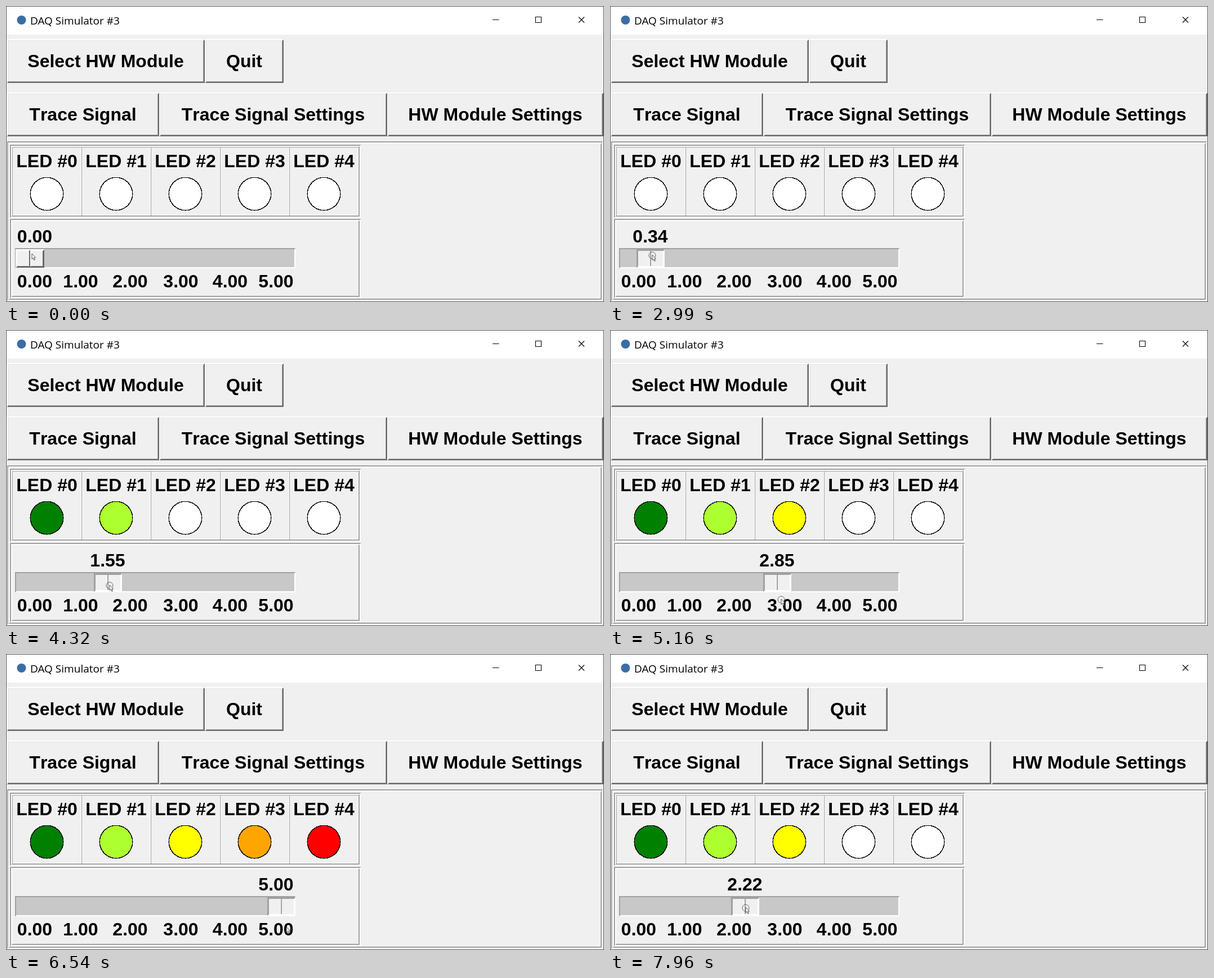
An HTML page for the animation above (8000 ms loop, 1062 by 527 pixels).

```html
<!DOCTYPE html>
<html lang="en">
<head>
<meta charset="utf-8">
<title>DAQ Simulator</title>
<style>
  html, body { margin: 0; width: 100%; height: 100%; overflow: hidden; background: #f0f0f0; }
  svg { display: block; width: 1062px; height: 527px; }
  text { font: bold 32px "Liberation Sans", Arial, sans-serif; font-kerning: none; text-anchor: middle; }
  .title { font: 19px "Open Sans", "Noto Sans", sans-serif; text-anchor: start; }
  .crisp { shape-rendering: crispEdges; }
</style>
</head>
<body>
<svg id="stage" viewBox="0 0 1062 527">
  <rect width="1062" height="527" fill="#f0f0f0"/>
  <rect width="1062" height="51" fill="#fff"/>
  <circle cx="27.5" cy="25" r="8" fill="#3a6ea5"/>
  <text class="title" x="43" y="33">DAQ Simulator #3</text>
  <g fill="none" stroke="#000" stroke-width="1.1">
    <path d="M864 24.5h11.5M940.5 19.5h10v10h-10z"/>
    <path d="M1017 19.500l10 10M1027 19.500l-10 10"/>
  </g>
  <g id="panel" class="crisp"></g>
  <g id="labels"></g>
  <text id="value" y="421"></text>
  <g id="thumb" class="crisp">
    <g id="raised"></g>
    <g id="sunken"></g>
  </g>
  <g id="cursor">
    <circle id="ring" r="6" fill="none" stroke="#555" stroke-width=".9"/>
    <path d="M0 -1V8.500L2.200 6.600L4 10.500L5.500 9.800L3.800 6H6.500Z" fill="#fff" stroke="#444" stroke-width=".9"/>
  </g>
  <rect class="crisp" x=".5" y=".5" width="1061" height="526" fill="none" stroke="#555"/>
</svg>
<script>
const LOOP = 8000, PRESS = 1090;
const GRAY = '#a0a0a0', DARK = '#696969', LIGHT = '#fff', FACE = '#f0f0f0';
const LEDS = [['#008000', .5], ['#adff2f', 1], ['#ffff00', 2], ['#ffa500', 3.5], ['#ff0000', 4.5]];

// Each pose: time, value, pointer offset from the thumb, pointer y, steps since the previous pose
const POSES = [
  [0, 0, 29, 442, 1],
  [2370, 0, 29, 444, 1],
  [2990, .34, 28, 444, 8],
  [3140, .48, 28, 445, 2],
  [3470, .70, 28, 447, 5],
  [3780, .82, 28, 448, 1],
  [4320, 1.55, 28, 455, 7],
  [4500, 1.78, 28, 460, 2],
  [5160, 2.85, 32, 480, 9],
  [5340, 3.06, 32, 482, 2],
  [6190, 4.40, 33, 486, 11],
  [6540, 5, 34, 487, 5],
  [6940, 4.75, 34, 487, 1],
  [7690, 2.89, 28, 458, 11],
  [7780, 2.66, 27, 456, 1],
  [7960, 2.22, 26, 452, 3]
];

const $ = id => document.getElementById(id);
function add(parent, tag, attrs, text = '') {
  const node = document.createElementNS('http://www.w3.org/2000/svg', tag);
  for (const name in attrs) node.setAttribute(name, attrs[name]);
  node.textContent = text;
  return parent.appendChild(node);
}
const box = (parent, x, y, width, height, fill) => add(parent, 'rect', { x, y, width, height, fill });
const label = (x, y, text) => add($('labels'), 'text', { x, y }, text);

function bevel(parent, x, y, w, h, b, topLeft, bottomRight, fill) {
  box(parent, x, y, w, h, fill);
  add(parent, 'path', { fill: topLeft,
    d: `M${x} ${y}h${w}l${-b} ${b}h${2 * b - w}v${h - 2 * b}l${-b} ${b}z` });
  add(parent, 'path', { fill: bottomRight,
    d: `M${x + w} ${y + h}h${-w}l${b} ${-b}h${w - 2 * b}v${2 * b - h}l${b} ${-b}z` });
}
function groove(x, y, w, h) {
  bevel($('panel'), x, y, w, h, 2, GRAY, LIGHT, FACE);
  bevel($('panel'), x + 2, y + 2, w - 4, h - 4, 2, LIGHT, GRAY, FACE);
}
function button(x, y, w, text) {
  bevel($('panel'), x, y, w, 78, 2, LIGHT, DARK, FACE);
  bevel($('panel'), x + 2, y + 2, w - 4, 74, 1, '#e3e3e3', GRAY, FACE);
  label(x + w / 2, y + 50, text);
}

button(1, 59, 352, 'Select HW Module');
button(353, 59, 140, 'Quit');
button(1, 154, 271, 'Trace Signal');
button(272, 154, 405, 'Trace Signal Settings');
button(677, 154, 384, 'HW Module Settings');

groove(2, 241, 1058, 284);
groove(7, 247, 623, 130);
groove(7, 379, 623, 141);

const lamps = LEDS.map((led, i) => {
  const x = 11 + 123 * i;
  bevel($('panel'), x, 251, 123, 122, 1, GRAY, LIGHT, FACE);
  label(x + 61.5, 287, 'LED #' + i);
  return add($('panel'), 'circle', { cx: x + 61.5, cy: 334.5, r: 29.25, stroke: '#000', 'stroke-width': 1.5 });
});

bevel($('panel'), 16, 431, 498, 36, 2, GRAY, LIGHT, '#c8c8c8');
[51, 132.5, 220.5, 310.5, 398, 479.5].forEach((x, i) => label(x, 501, i.toFixed(2)));

// Thumb faces, drawn from its own left edge
bevel($('raised'), 0, 433, 51, 33, 3, LIGHT, DARK, FACE);
box($('raised'), 24, 435, 2, 29, DARK);
box($('raised'), 26, 435, 1, 29, LIGHT);
bevel($('sunken'), 0, 433, 50, 33, 3, GRAY, LIGHT, FACE);
box($('sunken'), 23, 436, 1, 27, LIGHT);
box($('sunken'), 24, 435, 1.5, 28, GRAY);

function poseAt(t) {
  const next = POSES.findIndex(pose => pose[0] > t);
  if (next < 0) return POSES[POSES.length - 1];
  const from = POSES[next - 1], to = POSES[next], steps = to[4];
  const k = Math.floor((t - from[0]) / (to[0] - from[0]) * steps) / steps;
  return from.map((v, i) => v + (to[i] - v) * k);
}

function render(t) {
  const [, value, offset, y] = poseAt(t);
  const left = Math.round(17 + 89.4 * value);
  const pressed = t >= PRESS;
  $('value').textContent = value.toFixed(2);
  $('value').setAttribute('x', Math.min(479.5, Math.max(51, left + 24.5)));
  $('thumb').setAttribute('transform', `translate(${left})`);
  $('raised').style.display = pressed ? 'none' : '';
  $('sunken').style.display = pressed ? '' : 'none';
  $('cursor').setAttribute('transform', `translate(${left + offset} ${y})`);
  $('ring').style.display = pressed && value < 5 ? '' : 'none';
  lamps.forEach((lamp, i) => lamp.setAttribute('fill', value >= LEDS[i][1] ? LEDS[i][0] : '#fff'));
}

const start = performance.now();
function tick() {
  render((performance.now() - start) % LOOP);
  requestAnimationFrame(tick);
}
tick();
</script>
</body>
</html>
```
